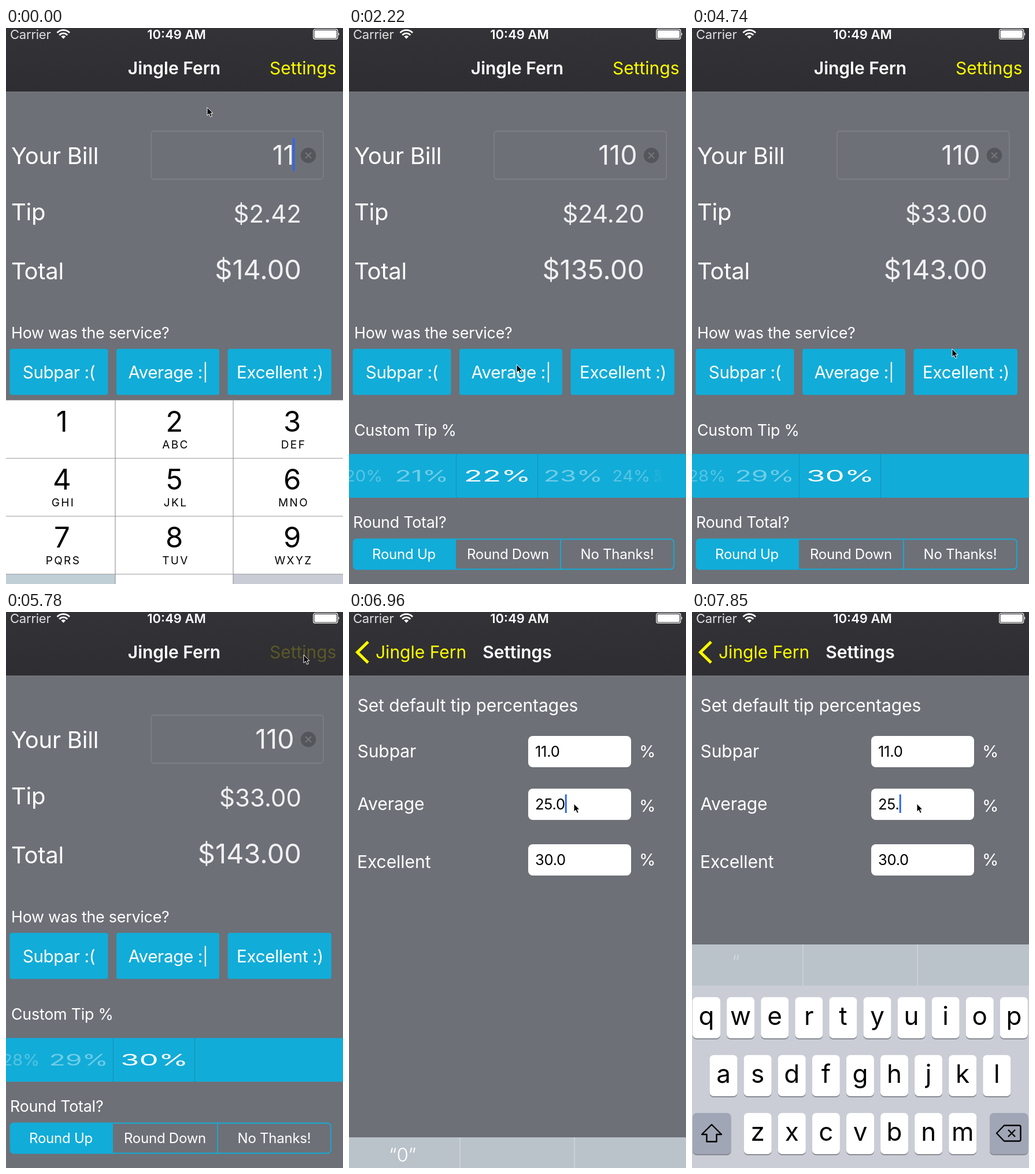
An HTML page that plays this animation: 583 by 960 pixels, repeating every 8 s.

```html
<!DOCTYPE html>
<html lang="en">
<head>
<meta charset="utf-8">
<title>Tip calculator</title>
<style>
  html, body { margin: 0; width: 100%; height: 100%; overflow: hidden; background: #6d7077; }
  svg { display: block; width: 100%; height: 100%; }
  text { font-family: Inter, "Liberation Sans", sans-serif; font-optical-sizing: none; letter-spacing: -.01em; white-space: pre; fill: #fff; }
  .mid { text-anchor: middle; }
  .end { text-anchor: end; }
  .label { font-size: 40px; letter-spacing: -.006em; }
  .value { text-anchor: end; letter-spacing: 0; fill: #f0f0f3; }
  .note { font-size: 26.8px; letter-spacing: -.008em; }
  .button { font-size: 29.5px; text-anchor: middle; }
  .segment { font-size: 24px; text-anchor: middle; }
  .row { font-size: 30px; letter-spacing: -.002em; }
  .title { font-size: 30px; font-weight: 600; text-anchor: middle; letter-spacing: 0; }
  .bar { font-size: 30px; letter-spacing: 0; fill: #ff0; }
  .field { font-size: 25.5px; fill: #000; }
  .item { font-size: 27px; text-anchor: middle; letter-spacing: 0; }
  .digit { font-size: 49px; text-anchor: middle; fill: #000; }
  .letters { font-size: 19px; text-anchor: middle; letter-spacing: 2.4px; fill: #000; }
  .key { font-size: 44px; text-anchor: middle; fill: #000; letter-spacing: 0; }
  .blue { fill: #12acd8; }
  .caret { fill: #2f66f0; }
</style>
</head>
<body>
<svg viewBox="0 0 583 960">
  <defs>
    <linearGradient id="shade" x2="0" y2="1">
      <stop stop-color="#333236"/><stop offset="1" stop-color="#2e2d31"/>
    </linearGradient>
  </defs>
  <rect width="583" height="960" fill="#6d7077"/>

  <g id="main">
    <text class="label" x="9" y="235">Your Bill</text>
    <text class="label" x="9" y="332">Tip</text>
    <text class="label" x="9" y="434">Total</text>
    <rect x="251" y="178" width="298" height="83" rx="5" fill="none" stroke="#7e7f82" stroke-width="1.8"/>
    <text id="bill" class="value" x="498.5" y="236" font-size="46.5"></text>
    <rect id="billCaret" class="caret" x="496" y="190" width="3.5" height="57"/>
    <circle cx="523" cy="220" r="13.2" fill="#54565b"/>
    <path d="M518 215l10 10m0-10l-10 10" stroke="#75777d" stroke-width="2"/>
    <text id="tip" class="value" x="511" y="336" font-size="42"></text>
    <text id="total" class="value" x="511" y="434" font-size="47"></text>

    <text class="note" x="9" y="536">How was the service?</text>
    <g class="blue">
      <rect x="6.5" y="554" width="170" height="79.5" rx="4"/>
      <rect x="191" y="554" width="178" height="79.5" rx="4"/>
      <rect x="383.5" y="554" width="179.5" height="79.5" rx="4"/>
    </g>
    <text class="button" x="91.5" y="605">Subpar :(</text>
    <text class="button" x="280.5" y="605">Average :|</text>
    <text class="button" x="474" y="605">Excellent :)</text>

    <text class="note" x="9" y="704">Custom Tip %</text>
    <rect class="blue" y="735.5" width="583" height="75.5"/>
    <path d="M185.5 735.5v75.5M326.5 735.5v75.5" stroke="#0e92b9"/>
    <g id="wheel"></g>

    <text class="note" x="7" y="863">Round Total?</text>
    <rect class="blue" x="7" y="882" width="178" height="53" rx="6"/>
    <rect class="blue" x="170" y="882" width="15" height="53"/>
    <path d="M366 882v53" stroke="#12acd8" stroke-width="1.8"/>
    <rect x="7.5" y="882.5" width="554.5" height="52" rx="6" fill="none" stroke="#12acd8" stroke-width="1.8"/>
    <text class="segment" x="95" y="917">Round Up</text>
    <text class="segment" x="275" y="917">Round Down</text>
    <text class="segment" x="464" y="917">No Thanks!</text>
  </g>

  <g id="keypad">
    <rect y="642" width="583" height="400" fill="#fff"/>
    <rect y="943" width="189" height="99" fill="#c0ced6"/>
    <rect x="393" y="943" width="190" height="99" fill="#c9ccd5"/>
    <path d="M0 642.5h583M0 743h583M0 843h583M0 943h583M189 642v400M393 642v400" stroke="#96989b" stroke-width="1.2"/>
  </g>

  <g id="settings">
    <rect y="110" width="583" height="850" fill="#6d7077"/>
    <text class="row" x="14.5" y="172">Set default tip percentages</text>
    <text class="row" x="14.5" y="251">Subpar</text>
    <text class="row" x="14.5" y="342">Average</text>
    <text class="row" x="14" y="442">Excellent</text>
    <g fill="#fff">
      <rect x="310" y="214" width="178" height="54" rx="8"/>
      <rect x="310" y="305" width="178" height="54" rx="8"/>
      <rect x="310" y="401" width="178" height="54" rx="8"/>
    </g>
    <text class="field" x="322" y="250">11.0</text>
    <text id="average" class="field" x="322" y="341"></text>
    <text class="field" x="322" y="437">30.0</text>
    <text x="502" y="251" font-size="29">%</text>
    <text x="502" y="345" font-size="29">%</text>
    <text x="502" y="438" font-size="29">%</text>
    <rect id="fieldCaret" class="caret" y="315" width="3" height="32"/>
  </g>

  <g id="keyboard">
    <rect y="574" width="583" height="470" fill="#cacdd5"/>
    <rect y="574" width="583" height="71" fill="#bac2ca"/>
    <path d="M192 574v71M390 574v71" stroke="#cdd2d8" stroke-width="1.8"/>
    <text id="hint" x="69" y="616" font-size="33" font-weight="300" style="letter-spacing:0"></text>
  </g>

  <rect width="583" height="110" fill="url(#shade)"/>
  <path d="M0 110.3h583" stroke="#828387" stroke-width="1"/>
  <text x="7" y="18.5" font-size="22" fill-opacity=".85">Carrier</text>
  <g fill="none" stroke="#fff" stroke-width="2.8">
    <path d="M88.5 8.2a15 15 0 0 1 21.5 0M92.3 12.2a9.6 9.6 0 0 1 13.9 0"/>
    <path d="M95.3 14.6a5.6 5.6 0 0 1 7.9 0l-3.95 4.2z" fill="#fff" stroke="none"/>
  </g>
  <text class="mid" x="295" y="18.5" font-size="22" font-weight="600" style="letter-spacing:0">10:49 AM</text>
  <rect x="531.7" y="2.2" width="42" height="17" rx="3" fill="none" stroke="#fff" stroke-width="1.2"/>
  <rect x="533.5" y="4" width="38.4" height="13.4" rx="1.5" fill="#fff"/>
  <path d="M575 7.5q2.6 3 0 6z" fill="#fff"/>

  <text id="mainTitle" class="title" y="80">Jingle Fern</text>
  <text id="link" class="bar end" x="571.5" y="80">Settings</text>
  <g id="back">
    <path id="chevron" d="M33 51.5L14.5 69.5L33 87.5" fill="none" stroke="#ff0" stroke-width="5"/>
    <text id="backLabel" class="bar" y="80">Jingle Fern</text>
  </g>
  <text id="nextTitle" class="title" y="80">Settings</text>

  <path id="pointer" d="M0 0V14L3.3 11L5.6 16.4L8.2 15.3L5.9 10.1H10Z" fill="#000" stroke="#fff" stroke-width="1"/>
</svg>
<script>
const LOOP = 8000, STEP = LOOP / 54;
const $ = id => document.getElementById(id);

function add(parent, tag, attrs, text = "") {
  const node = document.createElementNS("http://www.w3.org/2000/svg", tag);
  for (const name in attrs) node.setAttribute(name, attrs[name]);
  node.textContent = text;
  return parent.appendChild(node);
}
const clamp = v => Math.min(1, Math.max(0, v));
const ramp = (t, from, to) => clamp((t - from) / (to - from));
const smooth = p => p * p * (3 - 2 * p);
const easeOut = p => 1 - (1 - p) ** 3;
const shift = (id, x, y = 0) => $(id).setAttribute("transform", `translate(${x} ${y})`);
const fade = (id, value) => $(id).setAttribute("opacity", value);

// Number pad
["", "ABC", "DEF", "GHI", "JKL", "MNO", "PQRS", "TUV", "WXYZ"].forEach((letters, i) => {
  const x = [96.5, 291, 495][i % 3], y = 697 + 100 * Math.floor(i / 3);
  add($("keypad"), "text", { class: "digit", x, y }, i + 1);
  add($("keypad"), "text", { class: "letters", x: x + 2.5, y: y + 29 }, letters);
});

// Letter keyboard
function keyCap(x, y, width, fill) {
  add($("keyboard"), "rect", { x, y: y + 2, width, height: 71, rx: 7, fill: "#888b92" });
  add($("keyboard"), "rect", { x, y, width, height: 71, rx: 7, fill });
}
["qwertyuiop", "asdfghjkl", "zxcvbnm"].forEach((row, r) => {
  [...row].forEach((letter, i) => {
    const x = [1, 30.5, 89.7][r] + i * 59.1, y = 665 + 100 * r;
    keyCap(x, y, 48, "#fff");
    add($("keyboard"), "text", { class: "key", x: x + 24, y: y + 47.5 }, letter);
  });
});
keyCap(1, 865, 66.5, "#a1a6b6");
keyCap(515, 865, 66.5, "#a1a6b6");
add($("keyboard"), "path", {
  d: "M34 885L51 902H42.5V914.5H25.5V902H17ZM527 900L540 886.5H566Q568.5 886.5 568.5 889V911Q568.5 913.5 566 913.5H540ZM547 894l12 12m0-12l-12 12",
  fill: "none", stroke: "#000", "stroke-width": 2.4, "stroke-linejoin": "round"
});

// Percent wheel: labels on a cylinder seen from the side
const wheel = [];
for (let n = 15; n <= 30; n++) wheel.push({ n, node: add($("wheel"), "text", { class: "item" }, n + "%") });

function turnWheel(position) {
  for (const { n, node } of wheel) {
    const d = n - position, angle = d * 28 * Math.PI / 180, squeeze = Math.cos(angle);
    const shown = Math.abs(d) < 3.2 && squeeze > 0;
    node.setAttribute("transform", `translate(${256.8 + 279 * Math.sin(angle)} 783) scale(${1.95 * Math.max(squeeze, .01)} 1)`);
    node.setAttribute("opacity", !shown ? 0 : Math.abs(d) < .5 ? 1 : .1 + .34 * squeeze);
  }
}

// Pointer path: time, x, y
const path = [
  [0, 348, 137], [740, 348, 137], [1630, 301, 515], [2222, 290, 581], [3110, 290, 581],
  [3700, 446, 583], [4590, 446, 583], [5630, 515, 74], [6222, 515, 74], [6660, 389, 331], [LOOP, 389, 331]
];
function movePointer(t) {
  const i = path.findIndex(stop => stop[0] > t);
  const [t0, x0, y0] = path[i - 1], [t1, x1, y1] = path[i];
  const p = smooth(ramp(t, t0, t1));
  shift("pointer", x0 + (x1 - x0) * p, y0 + (y1 - y0) * p);
}

function draw(t) {
  const bill = t < 440 ? 11 : 110;
  const percent = t < 2300 ? 22 : t < 3780 ? 25 : 30;
  const tip = bill * percent / 100;
  $("bill").textContent = bill;
  $("tip").textContent = "$" + tip.toFixed(2);
  $("total").textContent = "$" + Math.ceil(bill + tip).toFixed(2);
  fade("billCaret", t < 140 || t > 440 && t < 1700 ? 1 : 0);
  turnWheel(22 + 3 * smooth(ramp(t, 2300, 2800)) + 5 * smooth(ramp(t, 3780, 4280)));
  shift("keypad", 0, 400 * smooth(ramp(t, 1650, 1920)));

  // Push to the settings screen
  const push = easeOut(ramp(t, 5850, 6215));
  shift("main", -175 * push);
  shift("settings", 583 * (1 - push));
  fade("settings", push > 0 ? 1 : 0);
  $("mainTitle").setAttribute("x", 291 - 167 * push);
  $("backLabel").setAttribute("x", 46 + 167 * (1 - push));
  $("nextTitle").setAttribute("x", 291 + 292 * (1 - push));
  fade("mainTitle", 1 - push);
  fade("back", push);
  fade("nextTitle", push);
  fade("link", t < 5770 ? 1 : .2 * (1 - push));

  // Editing the average
  const erased = t > 7690;
  $("average").textContent = erased ? "25." : "25.0";
  $("fieldCaret").setAttribute("x", erased ? 358.7 : 373.7);
  fade("fieldCaret", t > 6950 ? 1 : 0);
  shift("keyboard", 0, t < 6950 ? 480 : 467 * (1 - smooth(ramp(t, 6847, 7175))));
  $("hint").textContent = erased ? "“" : "“0”";
  fade("hint", t > 7840 ? .35 : erased ? .7 : 1);

  movePointer(t);
}

function tick(now) {
  const t = now % LOOP;
  draw(Math.min(53, Math.floor((t + 9) / STEP)) * STEP);
  requestAnimationFrame(tick);
}
draw(0);
requestAnimationFrame(tick);
</script>
</body>
</html>
```
